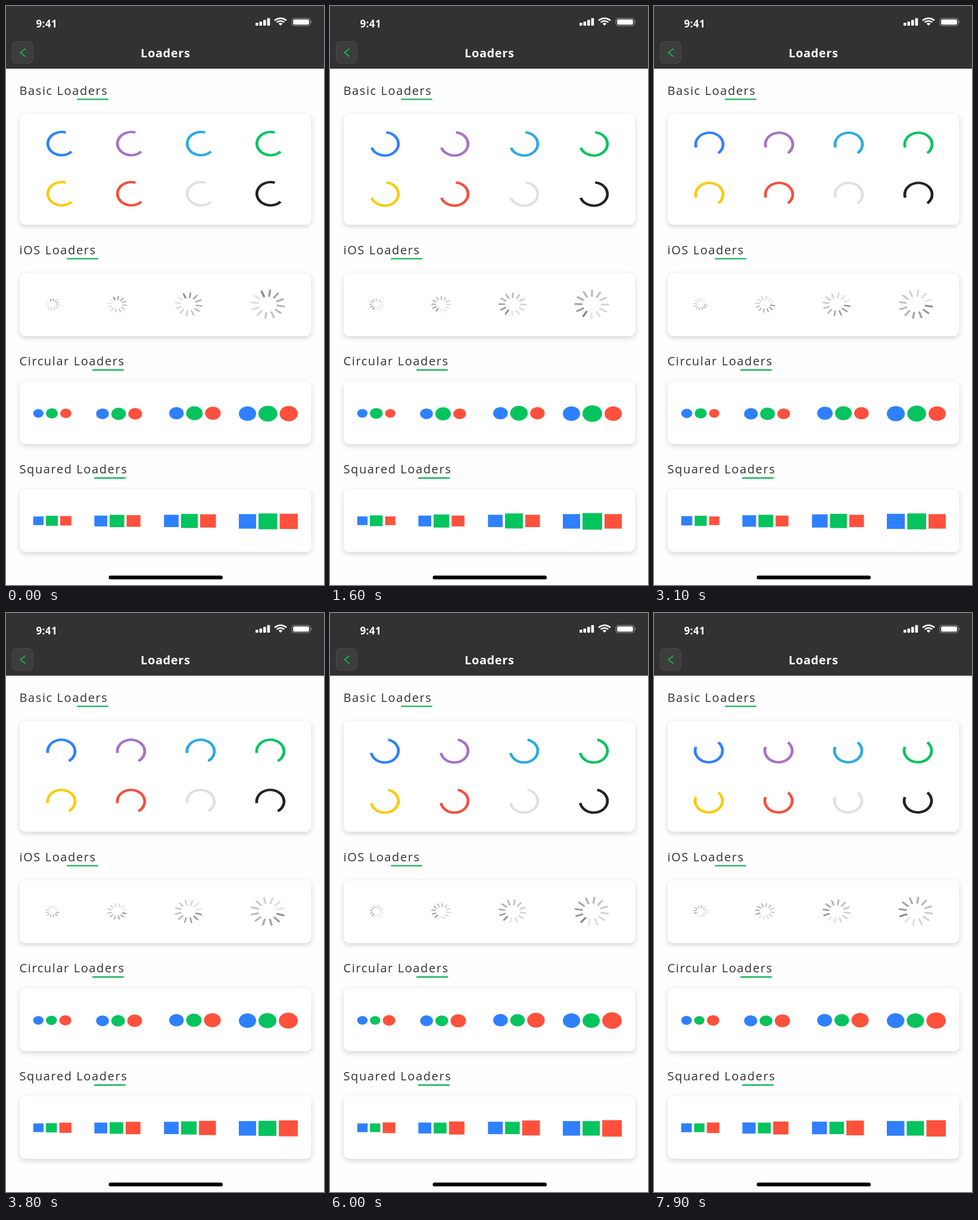
An HTML page that plays this animation: 534 px wide and 970 px high, repeating every 8 s.

```html
<!DOCTYPE html>
<html lang="en">
<head>
<meta charset="utf-8">
<title>Loaders</title>
<style>
  html, body { margin: 0; width: 100%; height: 100%; overflow: hidden; background: #fefefe; }
  svg { display: block; width: 100vw; height: 100vh; }
  text { font-family: "Open Sans", "Noto Sans", sans-serif; }
  .heading { font-size: 20px; letter-spacing: 1.6px; fill: #303030; }
  .title { font-size: 20px; font-weight: 700; letter-spacing: .6px; fill: #fff; }
  .clock { font-size: 17px; font-weight: 700; letter-spacing: .4px; fill: #fff; }
  .card { fill: #fff; filter: drop-shadow(0 3px 4px rgba(0, 0, 0, .17)); }
</style>
</head>
<body>
<svg id="stage" viewBox="0 0 534 970" xmlns="http://www.w3.org/2000/svg">
  <rect width="534" height="970" fill="#fefefe"/>
  <rect width="534" height="105" fill="#323232"/>

  <text class="clock" x="50.5" y="36">9:41</text>
  <g fill="#fff">
    <rect x="419" y="28" width="4.6" height="5" rx="1"/>
    <rect x="425.5" y="26" width="4.6" height="7" rx="1"/>
    <rect x="432" y="23.2" width="4.6" height="9.8" rx="1"/>
    <rect x="438.6" y="20.2" width="4.6" height="12.8" rx="1"/>
    <path d="M457.6 29.6 Q461 26.8 464.4 29.6 L461 33Z"/>
  </g>
  <g fill="none" stroke="#fff" stroke-width="2.4">
    <path d="M451 24.2 Q461 16.6 471 24.2"/>
    <path d="M454.6 27.4 Q461 22.4 467.4 27.4"/>
  </g>
  <rect x="480" y="20.7" width="31" height="12.4" rx="3.6" fill="none" stroke="#999" stroke-width="1"/>
  <rect x="482.2" y="22.6" width="26.6" height="8.6" rx="2" fill="#fff"/>
  <path d="M512.4 24.8 Q514.6 27 512.4 29Z" fill="#999"/>

  <rect x="10.5" y="59.5" width="35" height="36.5" rx="7" fill="#3d3d3d" stroke="#494949"/>
  <path d="M32.5 71.5 L24.5 78 L32.5 84.7" fill="none" stroke="#12b554" stroke-width="2"/>
  <text class="title" x="226" y="86">Loaders</text>

  <g id="sections"></g>
  <g id="loaders"></g>
  <rect x="172.5" y="954.2" width="191.5" height="6.4" rx="3.2" fill="#000"/>
</svg>

<script>
const BLUE = '#2f80fe', GREEN = '#05c35e', RED = '#fd513d';
const LOOP = 8000, TICK = 100;
const RING_COLORS = [BLUE, '#a871c5', '#2caae0', GREEN, '#fdca0b', '#f4503e', '#e0e0e0', '#222226'];

const sections = document.getElementById('sections');
const loaders = document.getElementById('loaders');

function add(parent, tag, attrs, text) {
  const el = document.createElementNS('http://www.w3.org/2000/svg', tag);
  for (const key in attrs) el.setAttribute(key, attrs[key]);
  if (text) el.textContent = text;
  parent.appendChild(el);
  return el;
}

function addSection(label, base, lineX, top, height) {
  add(sections, 'text', { class: 'heading', x: 22.5, y: base }, label);
  add(sections, 'rect', { x: lineX, y: base + 6.2, width: 53, height: 2.3, rx: 1, fill: '#1ab45c' });
  add(sections, 'rect', { class: 'card', x: 23, y: top, width: 489.5, height, rx: 9 });
}
addSection('Basic Loaders', 149, 119, 181, 185.5);
addSection('iOS Loaders', 416, 102, 448, 105);
addSection('Circular Loaders', 602.4, 145, 628.5, 105.5);
addSection('Squared Loaders', 783.4, 148, 809.5, 105);

// Everything is slightly wider than tall, so spinners turn inside a stretched group.
const spinners = [];
function addSpinner(x, y, scale) {
  const frame = add(loaders, 'g', { transform: `translate(${x} ${y}) scale(${scale * 1.185} ${scale})` });
  const spinner = add(frame, 'g', {});
  spinners.push(spinner);
  return spinner;
}

function polar(radius, deg) {
  const a = deg * Math.PI / 180;
  return `${radius * Math.sin(a)} ${-radius * Math.cos(a)}`;
}

// The rings turn around a point just right of their centre.
RING_COLORS.forEach((stroke, i) => {
  const ring = addSpinner(92.7 + 117 * (i % 4), i < 4 ? 231.1 : 315.1, 1);
  add(ring, 'path', {
    d: `M${polar(19.4, 5)} A19.4 19.4 0 1 1 ${polar(19.4, 250)}`,
    transform: 'translate(-.7 0)', fill: 'none', stroke, 'stroke-width': 4
  });
});

[[78, .407], [186.5, .57], [306.5, .81], [439.5, 1]].forEach(([x, scale]) => {
  const wheel = addSpinner(x, 499.8, scale);
  for (let k = 0; k < 12; k++) {
    const shade = Math.round(138 + 91 * Math.pow(k / 11, .75));
    const deg = 210 + 30 * k;
    add(wheel, 'path', {
      d: `M${polar(14.2, deg)} L${polar(23.3, deg)}`,
      stroke: `rgb(${shade},${shade},${shade})`, 'stroke-width': 3, 'stroke-linecap': 'round'
    });
  }
});

const rows = [];
function addRow(tag, left, small, big, y) {
  const shapes = [BLUE, GREEN, RED].map(fill => add(loaders, tag, { fill }));
  rows.push({ tag, left, small, big, y, shapes });
}
[[45.7, 17.3, 21.5, 682.5], [151.3, 21.5, 26.2, 683.2], [274, 24.5, 29.6, 682.2], [391, 29, 33, 682.9]]
  .forEach(row => addRow('ellipse', ...row));
[[45.7, 17.3, 21.5, 862.4], [148.4, 21.6, 26.2, 862.8], [265.3, 24.6, 30, 862.7], [391, 29, 33, 863.4]]
  .forEach(row => addRow('rect', ...row));

function placeRow(row, weights) {
  let x = row.left;
  row.shapes.forEach((shape, i) => {
    const w = row.small + (row.big - row.small) * weights[i];
    const h = w * .84;
    const attrs = row.tag === 'rect'
      ? { x, y: row.y - h / 2, width: w, height: h }
      : { cx: x + w / 2, cy: row.y, rx: w / 2, ry: h / 2 };
    for (const key in attrs) shape.setAttribute(key, attrs[key]);
    x += w + 4;
  });
}

const ease = x => x < .5 ? 4 * x ** 3 : 1 - 4 * (1 - x) ** 3;

// Number of turns done; there is a short rest before the seventh.
function turnsAt(t) {
  return t < 3443 ? Math.min((t + 270) / 604.5, 6) : 6 + (t - 3443) / 610.5;
}

function draw(t) {
  const turns = turnsAt(t);
  const step = Math.floor(turns);
  const p = ease(turns - step);
  spinners.forEach(s => s.setAttribute('transform', `rotate(${360 * p})`));

  const weights = [0, 0, 0];
  weights[(step + 1) % 3] = 1 - p;
  weights[(step + 2) % 3] = p;
  rows.forEach(row => placeRow(row, weights));
}

const start = performance.now();
function frame() {
  const t = (performance.now() - start) % LOOP;
  draw(Math.floor(t / TICK) * TICK);
  requestAnimationFrame(frame);
}
frame();
</script>
</body>
</html>
```
